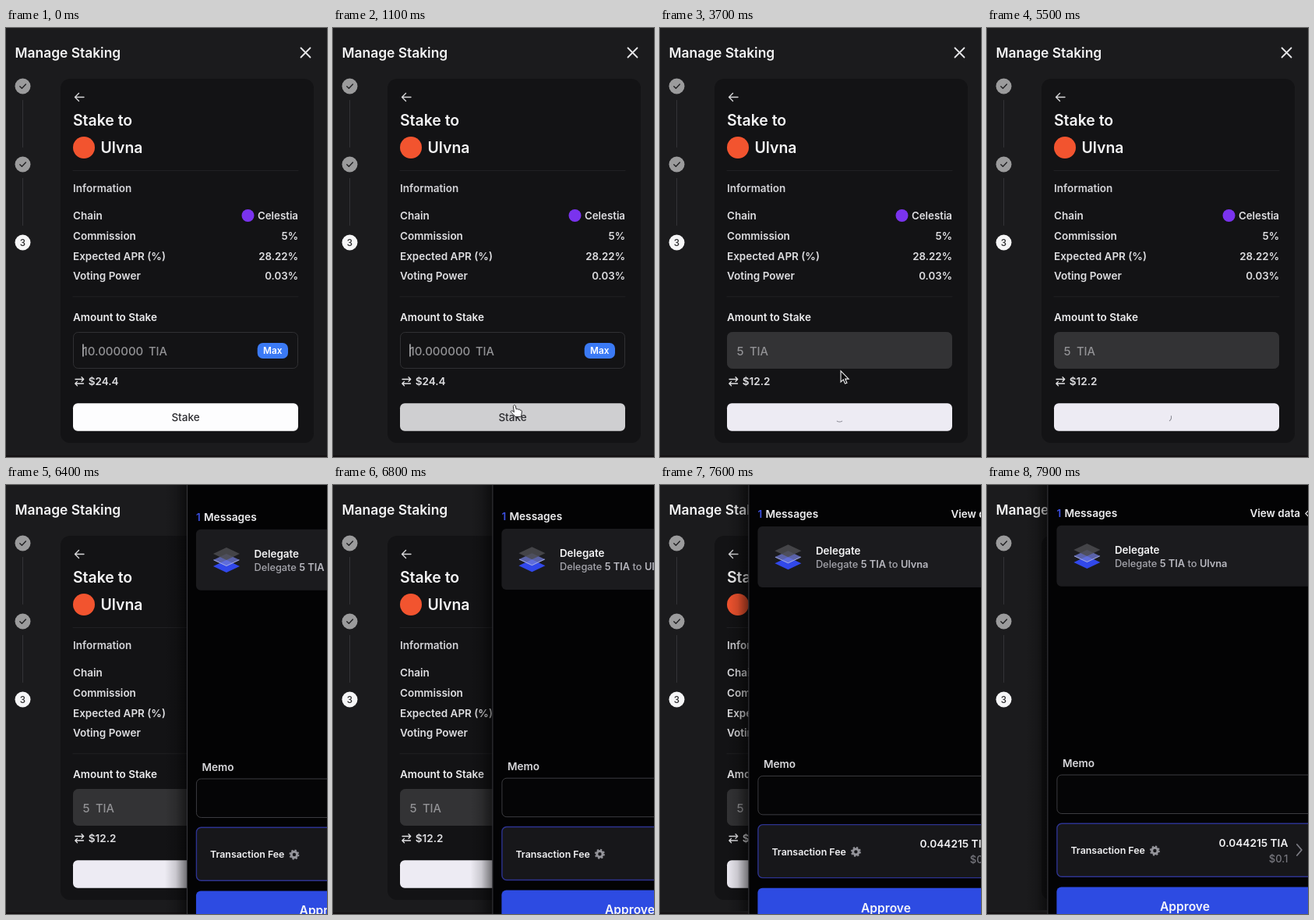
These frames come from a looping animation (412x549 px, 8000 ms). An HTML page:

```html
<!DOCTYPE html>
<html lang="en">
<head>
<meta charset="utf-8">
<title>Manage Staking</title>
<style>
  html, body { margin: 0; width: 100%; height: 100%; overflow: hidden; background: #1b1b1d; }
  svg { display: block; width: 412px; height: 549px; }
  text { font-family: Inter, "Open Sans", sans-serif; font-weight: 600; white-space: pre; }
  .end { text-anchor: end; }
  .mid { text-anchor: middle; }
  .medium { font-weight: 500; }
  .bold { font-weight: 600; }
  .line { fill: none; stroke-linecap: round; stroke-linejoin: round; }
</style>
</head>
<body>
<svg id="stage" viewBox="0 0 412 549"></svg>
<script>
const LOOP = 8000;
const TYPED = 2600, PRESSED = 3400, POPUP = 6000;
const VALIDATOR = 'Ulvna';

// Text is placed by the vertical centre of its capitals.
const text = (x, cy, str, { size = 13.5, fill = '#dedee1', cls = '', id = '' } = {}) =>
  `<text id="${id}" class="${cls}" x="${x}" y="${cy + size * 0.364}" style="font-size:${size}px;fill:${fill}">${str}</text>`;
const box = (x, y, w, h, r, fill, extra = '') =>
  `<rect x="${x}" y="${y}" width="${w}" height="${h}" rx="${r}" fill="${fill}" ${extra}/>`;
const disc = (x, y, r, fill) => `<circle cx="${x}" cy="${y}" r="${r}" fill="${fill}"/>`;
const line = (d, stroke, width = 1, extra = '') =>
  `<path class="line" d="${d}" stroke="${stroke}" stroke-width="${width}" ${extra}/>`;
const rhombus = (cy, fill) => `<path d="M34 ${cy}l17 -8 17 8 -17 8z" fill="${fill}"/>`;

const doneStep = y => disc(21.5, y, 10, '#9b9b9c') +
  line(`M17.8 ${y + .2}l2.6 2.6 5 -5.2`, '#222224', 1.4) +
  line(`M21.5 ${y + 18}v60`, '#343437');

const rows = [['Chain', 'Celestia', 240], ['Commission', '5%', 266],
  ['Expected APR (%)', '28.22%', 292], ['Voting Power', '0.03%', 317]];

const page = box(0, 547, 412, 2, 0, '#141012') +
  text(11.5, 31.5, 'Manage Staking', { size: 17.4, fill: '#f4f4f5' }) +
  line('M378.5 25.5l12 12M390.5 25.5l-12 12', '#e6e6e8', 1.8) +
  doneStep(74.5) + doneStep(174.5) + disc(21.5, 274.5, 10, '#f6f6f7') +
  text(21.5, 274.5, '3', { size: 11.6, fill: '#29292b', cls: 'mid medium' }) +
  box(70, 65, 325, 466, 12, '#131315') +
  line('M100 88.5H88.5M93.5 83.5l-5 5 5 5', '#d8d8da', 1.4) +
  text(86, 117.5, 'Stake to', { size: 19.4, fill: '#f4f4f5' }) +
  disc(100, 153, 14, '#f2542f') +
  text(121.5, 153, VALIDATOR, { size: 19.4, fill: '#f4f4f5' }) +
  line('M86 182.5H375M86 343.8H375', '#202023') +
  text(86, 205.5, 'Information', { fill: '#d4d4d8' }) +
  rows.map(([label, value, y]) => text(86, y, label) + text(375, y, value, { size: 13.3, cls: 'end' })).join('') +
  disc(310.5, 240, 8, '#7a33ee') +
  text(86, 370.5, 'Amount to Stake', { fill: '#ececee' }) +
  box(86.5, 389.5, 288, 46, 6, '#131315', 'id="field" stroke="#303033"') +
  text(98.5, 413.3, '', { size: 15, id: 'amount', cls: 'medium' }) +
  text(183, 413.3, 'TIA', { size: 14.7, id: 'unit', cls: 'medium' }) +
  box(98.3, 404.5, 1.3, 16, 0, '#d8d8da', 'id="caret"') +
  `<g id="max">${box(322.7, 403, 39.3, 20, 7, '#3b7af5')}${text(342.3, 413, 'Max', { size: 11.8, fill: '#fff', cls: 'mid' })}</g>` +
  line('M89 449.5H99.5M97 446.8l2.7 2.7 -2.7 2.7M99.5 455H89M91.5 452.4l-2.7 2.6 2.7 2.7', '#e4e4e6', 1.3) +
  text(105.8, 452.3, '', { id: 'worth' }) +
  box(86, 480.3, 289, 35.5, 6, '#fdfdfe', 'id="button"') +
  text(230.5, 498, 'Stake', { fill: '#2c2c30', cls: 'mid medium', id: 'stake' }) +
  line('M233.7 503.1A6 6 0 0 1 227.3 503.1', '#85858f', 1, 'id="spinner"');

const popup = box(-28, 0, 28, 549, 0, 'url(#shade)') +
  box(0, -10, 356, 580, 0, '#030304') + line('M.5 -10V570', '#3c3c40') +
  text(12, 41, '1', { fill: '#3b4fe0' }) +
  text(22, 41, 'Messages', { size: 13.7, fill: '#eeeef0' }) +
  text(260, 41, 'View data', { fill: '#eeeef0' }) +
  line('M335 38l-3.5 3.5 3.5 3.5M339 38l3.5 3.5 -3.5 3.5', '#d8d8da', 1.3) +
  box(12, 56.7, 330, 78, 6, '#1b1b1e') +
  rhombus(104, '#3148ea') + rhombus(96, '#6f7ad8c0') + line('M35 96l16 7.5 16 -7.5', '#b4bbe8', .8) +
  rhombus(88, '#4c4c50d8') +
  text(86.5, 88, 'Delegate', { size: 13.4, fill: '#f4f4f5' }) +
  text(86.5, 105, `Delegate <tspan class="bold" fill="#b9b9c0">5 TIA</tspan> to <tspan class="bold" fill="#b9b9c0">${VALIDATOR}</tspan>`,
    { size: 12.8, fill: '#a4a4ab', cls: 'medium' }) +
  text(19.5, 361, 'Memo', { size: 13.6, fill: '#d8d8dc' }) +
  box(12.5, 376, 329, 49.5, 6, '#050506', 'stroke="#3c3c40"') +
  box(12.5, 438.3, 329, 68, 6, '#17171a', 'stroke="#2d3390" stroke-width="1.4"') +
  text(30, 473, 'Transaction Fee', { size: 12.4, fill: '#f0f0f2' }) +
  '<circle cx="138" cy="473" r="3.7" fill="none" stroke="#94949a" stroke-width="3"/>' +
  '<circle cx="138" cy="473" r="5.6" fill="none" stroke="#94949a" stroke-width="1.8" stroke-dasharray="2.2 2.2"/>' +
  text(309, 463, '0.044215 TIA', { size: 13.7, cls: 'end', fill: '#f0f0f2' }) +
  text(309, 483, '$0.1', { size: 13, cls: 'end medium', fill: '#77777e' }) +
  line('M320.5 465l6 7 -6 7', '#7c7c84', 1.8) +
  box(12, 519.4, 330, 50, 6, '#2d4be2') +
  text(176.6, 544.5, 'Approve', { size: 15.6, cls: 'mid', fill: '#f6f6fa' });

const pointers =
  '<path id="arrow" d="M0 0V14l3.3 -3 2.2 5.2 2.4 -1 -2.2 -5h4.4z" fill="#0a0a0b" stroke="#f2f2f3" stroke-width="1.1"/>' +
  '<path id="hand" d="M-1.6 1.5C-1.6 -1 1 -1 1.4 1L2.2 5C3 4 4.6 4.3 4.8 5.4 5.8 4.7 7 5 7.2 6.2 8.4 5.7 9.4 6.5 9.4 8 9.5 10 8.5 12 8.3 14.5H.8C0 12.5 -3 10.5 -4.6 8.6 -5.4 7.4 -3.6 6 -2 7.4L-.6 8.6z" fill="#fff" stroke="#2a2a2c"/>' +
  line('M-2 -7.5Q0 -7.5 0 -6V6Q0 7.5 -2 7.5M2 -7.5Q0 -7.5 0 -6M0 6Q0 7.5 2 7.5', '#c8c8ca', 1.1, 'id="beam"');

document.getElementById('stage').innerHTML =
  '<defs><linearGradient id="shade"><stop stop-opacity="0"/><stop offset=".5" stop-opacity=".15"/><stop offset="1" stop-opacity=".52"/></linearGradient></defs>' +
  page + `<g id="cursor">${pointers}</g><g id="popup">${popup}</g>`;

const $ = id => document.getElementById(id);
const show = (id, on) => $(id).setAttribute('visibility', on ? 'inherit' : 'hidden');
const move = (id, x, y) => $(id).setAttribute('transform', `translate(${x} ${y})`);

// Each step: time, x, y.
const mousePath = [
  [[1000, 238, 466], [1100, 233, 483], [1300, 231, 487], [1500, 190, 440], [1800, 160, 413], [TYPED, 160, 413]],
  [[2800, 160, 430], [3000, 175, 476], [3300, 230, 490], [3450, 230, 488], [3700, 232, 439], [4000, 244, 426], [4200, 244, 426]],
];
const popupPath = [[6000, 241, 0], [6200, 239, 0], [6400, 232, 0], [6800, 204.5, -.8], [7200, 161, -2], [7550, 119.5, -3.4], [7900, 77.5, -5], [8000, 65, -5.4]];

function at(path, t) {
  const i = path.findIndex(step => step[0] > t);
  if (i < 1) return null;
  const [a, b] = [path[i - 1], path[i]];
  const k = (t - a[0]) / (b[0] - a[0]);
  return [a[1] + (b[1] - a[1]) * k, a[2] + (b[2] - a[2]) * k];
}

function draw(t) {
  const typed = t >= TYPED, loading = t >= PRESSED;
  $('amount').textContent = typed ? '5' : '10.000000';
  $('worth').textContent = typed ? '$12.2' : '$24.4';
  $('unit').setAttribute('x', typed ? 115 : 183);
  for (const id of ['amount', 'unit']) $(id).style.fill = typed && !loading ? '#efeff1' : '#929295';
  $('field').setAttribute('fill', loading ? '#333335' : '#131315');
  $('field').setAttribute('stroke', loading ? '#333335' : '#303033');
  $('caret').setAttribute('x', typed ? 108 : 98.3);
  show('caret', !loading && (typed ? t - TYPED : t) % 1000 < 500);
  show('max', !loading);

  const mouse = at(mousePath[0], t) || at(mousePath[1], t);
  const inside = (top, bottom) => !!mouse && !loading && mouse[1] >= top && mouse[1] <= bottom;
  const hover = inside(480, 516), editing = inside(390, 436);
  show('cursor', !!mouse);
  if (mouse) move('cursor', ...mouse);
  show('hand', hover);
  show('beam', editing);
  show('arrow', !hover && !editing);

  $('button').setAttribute('fill', loading ? '#edebf3' : hover ? '#cfcfd1' : '#fdfdfe');
  show('stake', !loading);
  show('spinner', loading);
  $('spinner').setAttribute('transform', `rotate(${(t - 3700) * 0.36} 230.5 498)`);

  const slide = at(popupPath, t);
  show('popup', t >= POPUP);
  if (slide) move('popup', ...slide);
}

const start = performance.now();
function tick() {
  draw((performance.now() - start) % LOOP);
  requestAnimationFrame(tick);
}
tick();
</script>
</body>
</html>
```
